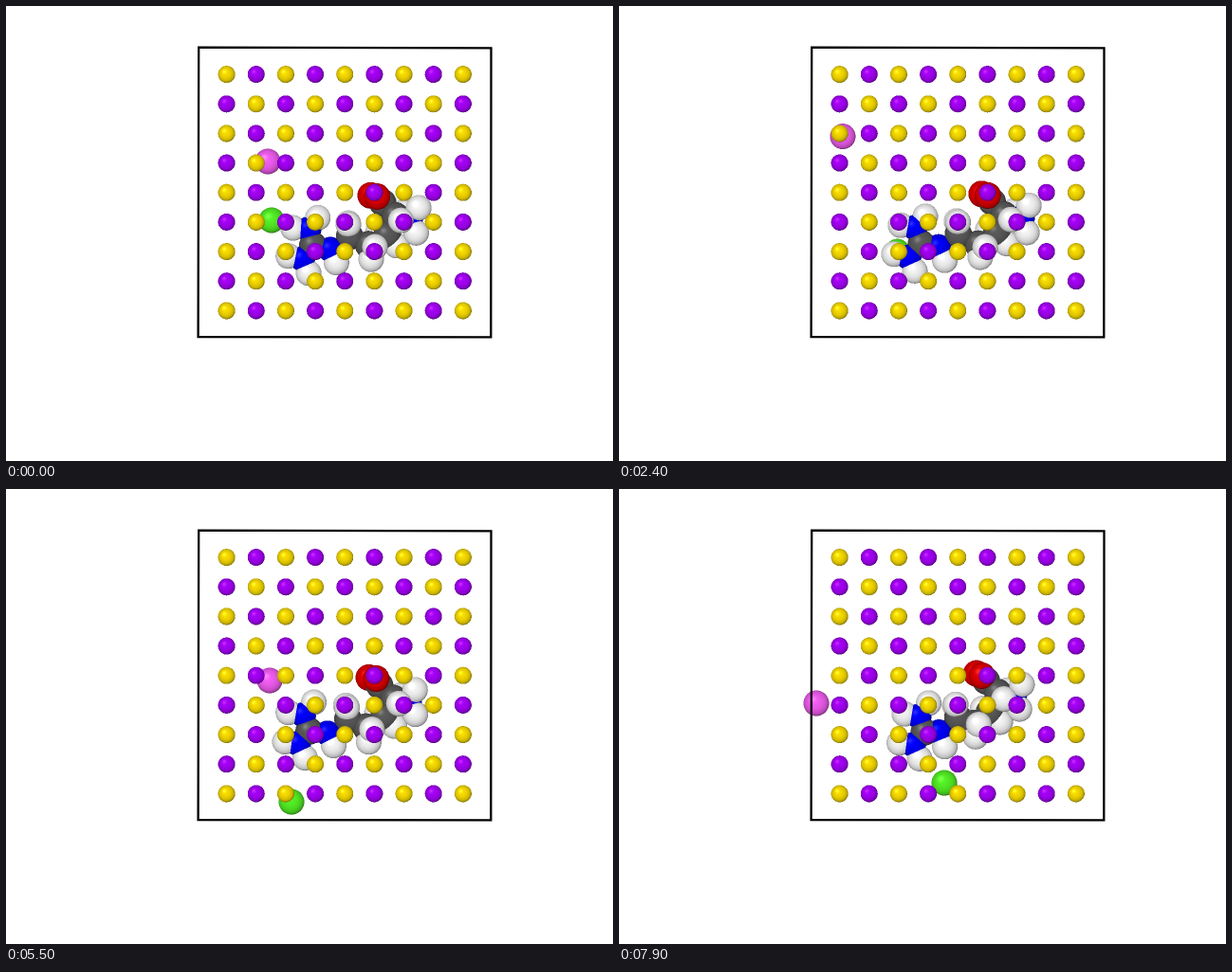
Write an HTML page with a canvas that moves like this. It is 640x480 px and loops after 8 s.

```html
<!DOCTYPE html>
<html lang="en">
<head>
<meta charset="utf-8">
<title>Molecule in a lattice</title>
<style>
  html, body { margin: 0; width: 100%; height: 100%; overflow: hidden; background: #fff; }
  canvas { display: block; width: 640px; height: 480px; }
</style>
</head>
<body>
<canvas id="stage" width="640" height="480"></canvas>
<script>
const LOOP = 8000, STEP = 100;
const AREA = { x: 190, y: 26, w: 330, h: 340 };
const SCALE = 2; // supersampling
const BOX_TOP = 44, BOX_BOTTOM = 349;

// radius and colour of each kind of sphere
const KIND = {
  H: [13.5, [240, 240, 240]],
  C: [14.5, [88, 88, 88]],
  N: [13.4, [0, 0, 245]],
  O: [14, [220, 0, 0]],
  pink: [13.5, [236, 92, 236]],
  green: [13.5, [82, 236, 36]],
  yellow: [9, [243, 215, 0]],
  purple: [9, [162, 0, 242]]
};
const LENGTH = { H: 16, C: 21.5, N: 18, O: 19 };

// key points of motion: time, x, y; the green path runs on through the lower wall
const PINK = [
  [0, 276, 164], [900, 243, 160], [1400, 226, 169], [1900, 217, 132],
  [2800, 251, 142], [3300, 267, 189], [4300, 285, 222], [5000, 225, 206],
  [5500, 278, 202], [6900, 264, 224], [7900, 208, 226]
];
const GREEN = [
  [0, 280, 226], [1400, 264, 246], [3300, 320, 271], [4300, 290, 282],
  [5500, 301, 330], [6250, 320, 349], [6900, 332, 352], [7900, 343, 310]
];
// drift of the two ends of the molecule
const LEFT_END = [
  [0, 0, 0], [1400, -6, 0], [3300, -7, -4], [5500, -4, 1.5], [6900, -6, 2], [7900, -2, 3.5]
];
const RIGHT_END = [
  [0, 0, 0], [1400, -6, -3], [3300, 0, 1], [4300, 1, -5], [5500, -2, -1],
  [6900, -7, -2], [7900, -10, -6]
];

const atoms = [];

function atom(kind, x, y, z) {
  const a = { kind, x, y, z };
  atoms.push(a);
  return a;
}

// angle turns clockwise from the right, tilt leans towards the viewer
function bond(from, kind, angle, tilt = 0) {
  const a = angle * Math.PI / 180, b = tilt * Math.PI / 180, len = LENGTH[kind];
  return atom(kind,
    from.x + len * Math.cos(a) * Math.cos(b),
    from.y + len * Math.sin(a) * Math.cos(b),
    from.z + len * Math.sin(b));
}

function buildMolecule() {
  const hub = atom('C', 324.5, 253, 0);
  for (const angle of [130, 250]) {
    const n = bond(hub, 'N', angle);
    bond(n, 'H', angle - 60);
    bond(n, 'H', angle + 60);
  }
  const link = bond(hub, 'N', 10);
  bond(link, 'H', 65);

  const delta = bond(link, 'C', -35, 0);
  delta.x += 3;
  delta.y -= 1;
  bond(delta, 'H', -94, 35);
  bond(delta, 'H', -100, -25);
  const gamma = bond(delta, 'C', 24);
  bond(gamma, 'H', 80, 15);
  bond(gamma, 'H', 27, 65);
  const beta = bond(gamma, 'C', -30);
  bond(beta, 'H', 45, -15);
  bond(beta, 'H', 200, -55);
  const alpha = bond(beta, 'C', -66);
  bond(alpha, 'H', 45, 58);

  const acid = bond(alpha, 'C', 225, -30);
  bond(acid, 'O', 216, -40);
  bond(acid, 'O', 230, 65);

  const amine = bond(alpha, 'N', 10, -10);
  bond(amine, 'H', -60, 30);
  bond(amine, 'H', 70, 15);
  bond(amine, 'H', 220, -50);
}

function along(path, t) {
  let n = 1;
  while (n < path.length - 1 && path[n][0] < t) n++;
  const [t0, x0, y0] = path[n - 1], [t1, x1, y1] = path[n];
  const u = Math.min(1, (t - t0) / (t1 - t0));
  return [x0 + (x1 - x0) * u, y0 + (y1 - y0) * u];
}

// repeatable value from -1 to 1
function noise(a, b) {
  const s = Math.sin(a * 127.1 + b * 311.7) * 43758.5453;
  return 2 * (s - Math.floor(s)) - 1;
}

const ctx = document.getElementById('stage').getContext('2d');
const layer = document.createElement('canvas');
const W = layer.width = AREA.w * SCALE;
const H = layer.height = AREA.h * SCALE;
const layerCtx = layer.getContext('2d');
const image = layerCtx.createImageData(W, H);
const depth = new Float32Array(W * H);

function sphere(kind, x, y, z) {
  const [radius, color] = KIND[kind];
  const cx = (x - AREA.x) * SCALE, cy = (y - AREA.y) * SCALE, r = radius * SCALE;
  for (let py = Math.max(0, Math.floor(cy - r)); py < Math.min(H, cy + r); py++) {
    for (let px = Math.max(0, Math.floor(cx - r)); px < Math.min(W, cx + r); px++) {
      const nx = (px + .5 - cx) / r, ny = (py + .5 - cy) / r;
      const d = 1 - nx * nx - ny * ny;
      if (d <= 0) continue;
      const nz = Math.sqrt(d), at = py * W + px, front = z + nz * radius;
      if (front <= depth[at]) continue;
      depth[at] = front;
      const lit = Math.max(0, -.12 * nx - .16 * ny + .98 * nz);
      const gloss = Math.max(0, -.28 * nx - .32 * ny + .905 * nz);
      const tone = .42 + .6 * Math.pow(lit, .6);
      const shine = 45 * Math.pow(gloss, 40);
      for (let c = 0; c < 3; c++) image.data[at * 4 + c] = color[c] * tone + shine;
      image.data[at * 4 + 3] = 255;
    }
  }
}

function drawIons(t) {
  const [px, py] = along(PINK, t), [gx, gy] = along(GREEN, t);
  sphere('pink', px, py, -70);
  sphere('green', gx, gy > BOX_BOTTOM ? gy - (BOX_BOTTOM - BOX_TOP) : gy, -70);
}

// each atom follows a blend of the two ends and trembles a little
function drawMolecule(t) {
  const [lx, ly] = along(LEFT_END, t), [rx, ry] = along(RIGHT_END, t);
  atoms.forEach(({ kind, x, y, z }, n) => {
    const u = Math.max(0, Math.min(1, (x - 325) / 70));
    const dx = lx + (rx - lx) * u + noise(n, t / STEP);
    const dy = ly + (ry - ly) * u + noise(n + 50, t / STEP);
    sphere(kind, x + dx, y + dy, z);
  });
}

function drawLattice() {
  for (let i = 0; i < 9; i++) {
    for (let j = 0; j < 9; j++) {
      sphere((i + j) % 2 ? 'purple' : 'yellow', 232.6 + 31.16 * i, 72.1 + 31.16 * j, 80);
    }
  }
}

function drawBox() {
  ctx.beginPath();
  ctx.moveTo(203.2, 43.6);
  ctx.lineTo(511.5, 44.4);
  ctx.lineTo(511.3, 349.4);
  ctx.lineTo(202.6, 349);
  ctx.closePath();
  ctx.lineWidth = 2.3;
  ctx.strokeStyle = '#000';
  ctx.stroke();
}

function draw(t) {
  image.data.fill(0);
  depth.fill(-1000);
  drawIons(t);
  drawMolecule(t);
  drawLattice();
  layerCtx.putImageData(image, 0, 0);

  ctx.fillStyle = '#fff';
  ctx.fillRect(0, 0, 640, 480);
  ctx.drawImage(layer, AREA.x, AREA.y, AREA.w, AREA.h);
  drawBox();
}

buildMolecule();
const start = performance.now();
let shown = -1;
function tick() {
  const t = Math.floor(((performance.now() - start) % LOOP) / STEP) * STEP;
  if (t !== shown) draw(shown = t);
  requestAnimationFrame(tick);
}
tick();
</script>
</body>
</html>
```
